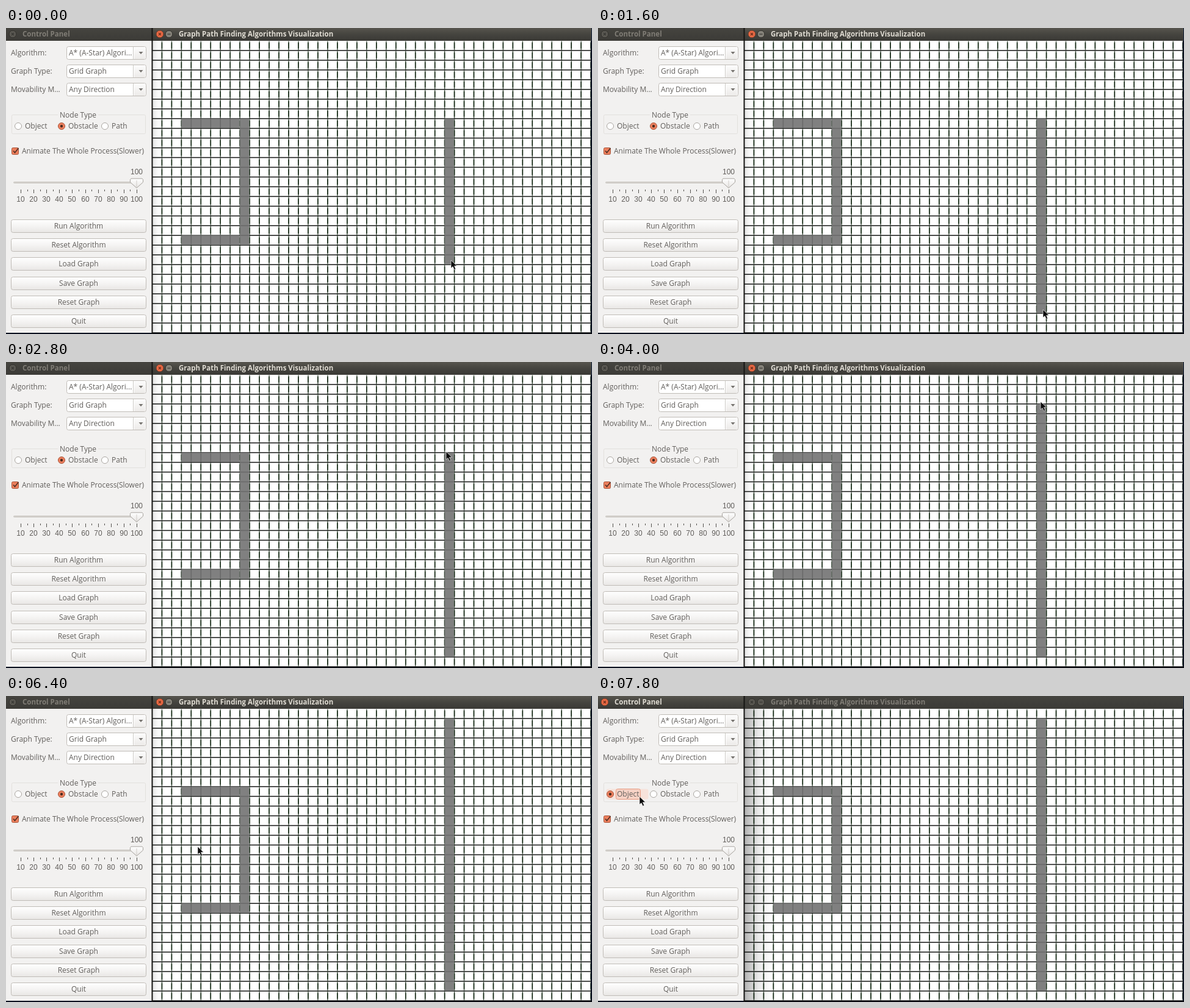
Write an HTML page with a canvas that moves like this. It is 960 px wide and 502 px high and loops after 8000 ms.

```html
<!DOCTYPE html>
<html lang="en">
<head>
<meta charset="utf-8">
<title>Graph Path Finding Algorithms Visualization</title>
<style>
html, body { margin: 0; width: 100%; height: 100%; overflow: hidden; background: #f2f1f0; }
canvas { display: block; width: 960px; height: 502px; }
</style>
</head>
<body>
<canvas id="stage" width="960" height="502"></canvas>
<script>
const ctx = document.getElementById('stage').getContext('2d');
const LOOP = 8000, STEP = 200;
const CELL = 15.97, LINE = 1.5, COLS = 45, ROWS = 30;
const SANS = '"Open Sans", "Noto Sans", sans-serif';
const UI = '12px ' + SANS;
const TITLE = 'bold 11.5px ' + SANS;
const DIGITS = '12px "Liberation Sans", Arial, sans-serif';
const INK = '#625f5c', ORANGE = '#ec7f5d', RIM = '#a8583e', DARK = '#4a2c22';
const HOVER_AT = 7200, CLICK_AT = 7600;

// time, x, y of the pointer tip
const POINTER = [
  [0, 729, 381], [1600, 729, 462], [2000, 729, 479], [2800, 721, 147],
  [4000, 725, 65], [4600, 727, 42], [5000, 568, 199], [6400, 314, 247],
  [7200, 71, 166], [7800, 68, 165], [8000, 68, 165]
];

// left and top edge of a grid line
const lineX = col => 254.7 + col * CELL;
const lineY = row => 36.1 + row * CELL;

function pointerAt(t) {
  const i = POINTER.findIndex((key, n) => n > 0 && t <= key[0]);
  const [t0, x0, y0] = POINTER[i - 1], [t1, x1, y1] = POINTER[i];
  const k = (t - t0) / (t1 - t0);
  return [Math.round(x0 + (x1 - x0) * k), Math.round(y0 + (y1 - y0) * k)];
}

function rect(x, y, w, h, color) {
  ctx.fillStyle = color;
  ctx.fillRect(x, y, w, h);
}

function gradient(x0, y0, x1, y1, ...colors) {
  const g = ctx.createLinearGradient(x0, y0, x1, y1);
  colors.forEach((c, i) => g.addColorStop(i / (colors.length - 1), c));
  return g;
}

function text(str, x, y, { font = UI, color = INK, align = 'left' } = {}) {
  ctx.font = font;
  ctx.fillStyle = color;
  ctx.textAlign = align;
  ctx.fillText(str, x, y);
}

function paint(fill, stroke, width = 1) {
  if (fill) { ctx.fillStyle = fill; ctx.fill(); }
  if (stroke) { ctx.strokeStyle = stroke; ctx.lineWidth = width; ctx.stroke(); }
}

function box(x, y, w, h, r, fill, stroke) {
  ctx.beginPath();
  ctx.roundRect(x + .5, y + .5, w - 1, h - 1, r);
  paint(fill, stroke);
}

function disc(x, y, r, fill, stroke) {
  ctx.beginPath();
  ctx.arc(x, y, r, 0, Math.PI * 2);
  paint(fill, stroke);
}

function path(points, fill, stroke, width, closed = true) {
  ctx.beginPath();
  points.forEach(([x, y]) => ctx.lineTo(x, y));
  if (closed) ctx.closePath();
  paint(fill, stroke, width);
}

function titleBar(x, w, label, textX, active) {
  rect(x, 0, w, 21, active
    ? gradient(0, 0, 0, 21, '#57554e', '#45443f', '#3a3935')
    : gradient(0, 0, 0, 21, '#45443f', '#3c3b37'));
  text(label, textX, 14, { font: TITLE, color: active ? '#dfdbd2' : '#807d76' });
}

function closeButton(x, active) {
  disc(x, 10, 5.8, active ? '#ea6a45' : '#5a5852', active ? '#8a412a' : '#34332f');
  const mark = active ? '#6b2f1d' : '#383733';
  path([[x - 2, 8], [x + 2, 12]], null, mark, 1.2, false);
  path([[x + 2, 8], [x - 2, 12]], null, mark, 1.2, false);
}

function minimizeButton(x, active) {
  disc(x, 10, 5.8, active ? '#858279' : '#5a5852', '#34332f');
  rect(x - 2.5, 9.5, 5, 1.2, '#383733');
}

function combo(label, value, y) {
  text(label, 8, y + 15);
  box(99, y, 131, 22, 3, '#fff', '#c0bcb7');
  rect(210, y + 1, 18, 20, gradient(0, y, 0, y + 22, '#fdfdfd', '#eceae8'));
  rect(208, y + 1, 1, 20, '#cbc8c4');
  path([[217.5, y + 9], [224.5, y + 9], [221, y + 13]], '#76736f');
  text(value, 103, y + 15);
}

function radio(x, label, checked) {
  disc(x, 161, 5.5, checked ? ORANGE : '#fff', checked ? RIM : '#aaa6a1');
  if (checked) disc(x, 161, 2.2, DARK);
  text(label, x + 11, 165);
}

function nodeTypes(hover, clicked) {
  box(9, 142, 220, 32, 2, null, '#e2e0dd');
  rect(85, 140, 66, 5, '#f2f1f0');
  text('Node Type', 118, 147, { align: 'center' });
  if (hover) box(13, 152, 70, 18, 3, '#f7e3db');
  if (clicked) box(29, 152, 41, 18, 3, '#f6d2c5', '#e79b82');
  radio(20, 'Object', clicked);
  radio(91, 'Obstacle', !clicked);
  radio(162, 'Path', false);
}

function checkbox() {
  box(9, 196, 12, 12, 2, ORANGE, RIM);
  path([[12, 201.5], [14.5, 204.5], [20.5, 197]], null, DARK, 1.5, false);
  text('Animate The Whole Process(Slower)', 26, 206);
}

function slider() {
  text('100', 214, 240, { font: DIGITS, align: 'center' });
  box(12, 252, 206, 3, 1, '#d8d5d1', '#c8c5c0');
  path([[203.5, 248.5], [205, 247], [223, 247], [224.5, 248.5], [224.5, 253], [214, 262.5], [203.5, 253]],
    gradient(0, 247, 0, 262, '#ffffff', '#e8e6e4'), '#a6a29d', 1);
  path([[214, 250], [214, 261]], null, '#d0cdc9', 1, false);
  for (let i = 0; i < 19; i++) {
    const x = Math.round(24 + i * 190 / 18);
    rect(x, 265, 1, i % 2 ? 3 : 6, '#55534f');
    if (i % 2 === 0) text(String(10 + i * 5), x, 285, { font: DIGITS, align: 'center' });
  }
}

function button(label, i) {
  const y = Math.round(314 + i * 31.2);
  box(8, y, 222, 22, 3, gradient(0, y, 0, y + 22, '#ffffff', '#f5f4f3', '#e8e6e4'), '#c0bcb7');
  text(label, 119, y + 15, { align: 'center' });
}

function controlPanel(t, active) {
  rect(0, 0, 240, 502, '#f2f1f0');
  titleBar(0, 239, 'Control Panel', 27, active);
  closeButton(11, active);
  combo('Algorithm:', 'A* (A-Star) Algori...', 30);
  combo('Graph Type:', 'Grid Graph', 60);
  combo('Movability M...', 'Any Direction', 90);
  nodeTypes(t >= HOVER_AT, active);
  checkbox();
  slider();
  ['Run Algorithm', 'Reset Algorithm', 'Load Graph', 'Save Graph', 'Reset Graph', 'Quit'].forEach(button);
  rect(0, 500, 240, 2, '#0b1220');
  rect(238.5, 0, 2, 502, '#151513');
}

// Dashed lines, greenish when upright, paler beside each crossing
function gridLines() {
  for (let col = 0; col < COLS; col++) {
    for (let row = -1; row < ROWS; row++) {
      const x = lineX(col), y = lineY(row);
      rect(x, y + LINE, LINE, CELL - LINE, '#4d5c4d');
      rect(x, y + 4, LINE, CELL - 6.5, '#122612');
    }
  }
  for (let row = 0; row < ROWS; row++) rect(240, lineY(row), 719, LINE, '#131513');
}

function shadow(width, alpha) {
  rect(240, 21, width, 479, gradient(240, 0, 240 + width, 0,
    `rgba(0,0,0,${alpha})`, `rgba(0,0,0,${alpha * .3})`, 'rgba(0,0,0,0)'));
}

// Cell counts are measured from the first full row and column
function obstacle(col, row, cols, rows) {
  const x = lineX(col) + LINE, y = lineY(row) + LINE;
  const w = cols * CELL - LINE / 2, h = rows * CELL - LINE / 2;
  rect(x - LINE / 2, y - LINE / 2, w, h, '#808080');
  for (let i = 1; i < cols; i++) rect(lineX(col + i), y, LINE, h - LINE, '#686868');
  for (let i = 1; i < rows; i++) rect(x, lineY(row + i), w - LINE, LINE, '#686868');
}

function obstacles(t) {
  obstacle(2, 7, 6, 1);
  obstacle(2, 19, 6, 1);
  obstacle(8, 7, 1, 13);
  const added = Math.min(6, Math.floor(t / 320));
  const raised = Math.max(0, Math.min(7, Math.floor((t - 2800) / 240)));
  obstacle(29, 7 - raised, 1, 15 + added + raised);
}

function pointer([x, y]) {
  const shape = [[0, 0], [0, 13], [3, 10.4], [5.4, 15.4], [7.7, 14.4], [5.4, 9.4], [9.6, 9.2]];
  path(shape.map(([dx, dy]) => [x + dx, y + dy]), '#0c0c0c', 'rgba(255,255,255,.75)', .8);
}

function draw(t) {
  const panelActive = t >= CLICK_AT;
  rect(240, 0, 720, 502, '#fff');
  gridLines();
  obstacles(t);
  if (panelActive) shadow(45, .3);
  else shadow(16, .1);
  rect(958, 21, 2, 481, '#0b1220');
  rect(240, 500, 720, 2, '#0b0d12');
  titleBar(240, 719, 'Graph Path Finding Algorithms Visualization', 283, !panelActive);
  rect(959, 0, 1, 21, '#16253c');
  closeButton(252, !panelActive);
  minimizeButton(267, !panelActive);
  controlPanel(t, panelActive);
  pointer(pointerAt(t));
}

const start = performance.now();
function tick() {
  const t = (performance.now() - start) % LOOP;
  draw(Math.floor(t / STEP) * STEP);
  requestAnimationFrame(tick);
}
tick();
</script>
</body>
</html>
```
